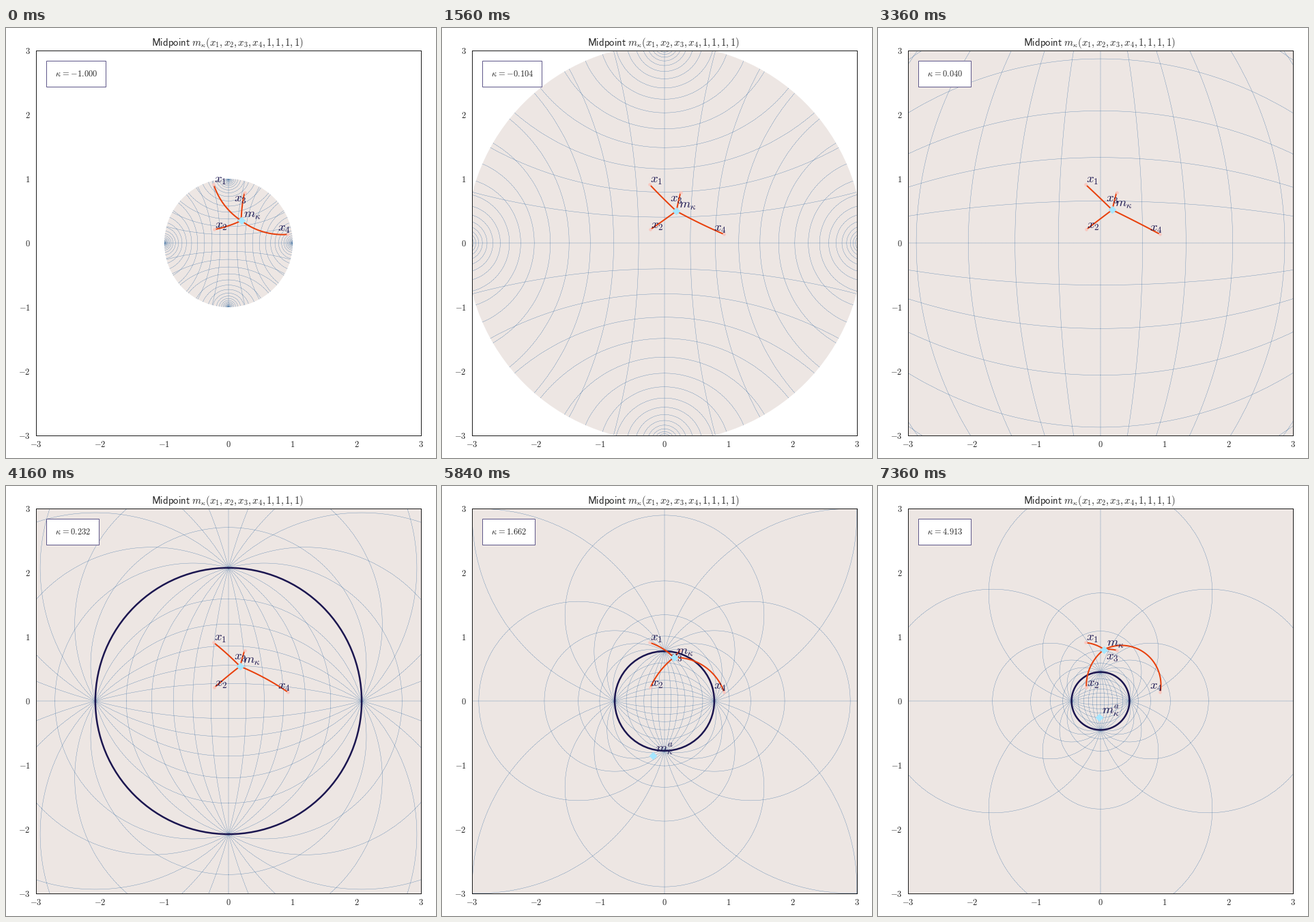
A matplotlib script that plays this animation: 630x630 px, repeating every 7.4 s.

```python
import matplotlib.pyplot as plt
import numpy as np
from matplotlib.animation import FuncAnimation
from matplotlib.collections import LineCollection

plt.rcParams.update({
    "mathtext.fontset": "cm",
    "font.family": "Liberation Serif",
    "text.color": "0.15",
    "xtick.color": "0.15",
    "ytick.color": "0.15",
})

SIZE, DPI = 630, 90
PLANE, GRID, NAVY = "#ede6e3", "#1c5a98", "#1b1650"
RED, SKY, PINK = "#e8400c", "#a6e6ff", "#f9c8c0"
LIM = 3

POINTS = np.array([(-0.23, 0.91), (-0.22, 0.21), (0.25, 0.79), (0.93, 0.135)])
LABEL_SHIFT = np.array([(0.01, 0.03), (0.01, 0.02), (-0.16, -0.15), (-0.16, 0.05)])
MID_SHIFT = np.array([0.04, 0.05])

# Curvatures follow a cubic; the nearly flat ones are skipped.
roots = np.linspace(-1, 1.7, 200)
CURVATURES = roots[np.abs(roots) >= 0.1] ** 3


def tan_k(t, k):
    s = np.sqrt(abs(k))
    return (np.tan(s * t) if k > 0 else np.tanh(s * t)) / s


def arctan_k(r, k):
    s = np.sqrt(abs(k))
    return (np.arctan(s * r) if k > 0 else np.arctanh(s * r)) / s


def mobius_add(x, y, k):
    xy = (x * y).sum(-1, keepdims=True)
    xx = (x * x).sum(-1, keepdims=True)
    yy = (y * y).sum(-1, keepdims=True)
    top = (1 - 2 * k * xy - k * yy) * x + (1 + k * xx) * y
    return top / (1 - 2 * k * xy + k * k * xx * yy)


def geodesic(a, b, k, n=60):
    v = mobius_add(-a, b, k)
    r = np.hypot(*v)
    t = np.linspace(0, 1, n)[:, None]
    return mobius_add(a, tan_k(t * arctan_k(r, k), k) * v / r, k)


def midpoint(k):
    """Gyromidpoint of POINTS with unit weights."""
    lam = 2 / (1 + k * (POINTS ** 2).sum(1))
    num, den = lam @ POINTS, (lam - 1).sum()
    r, s = np.hypot(*num), np.sqrt(abs(k))
    if k > 0:
        half = np.tan(np.arctan2(s * r, den) / 2)
    else:
        half = np.tanh(np.arctanh(s * r / den) / 2)
    return num / r * half / s


def grid_lines(k):
    radius = 1 / np.sqrt(abs(k))
    step = 2 * np.pi * radius / 24
    if k < 0:
        starts = tan_k(step * np.arange(1, 23) / 2, k)
        starts = np.concatenate([starts, -starts])
        b = tan_k(np.linspace(-3.7, 3.7, 161) * radius, k)
    else:
        starts = tan_k(step * np.arange(1, 12) / 2, k)
        b = tan_k(np.linspace(-1, 1, 500) * (np.pi / 2 - 1e-5) * radius, k)
    lines = []
    for a in starts:
        den = 1 + (k * a * b) ** 2
        u = (1 - k * b * b) * a / den
        v = (1 + k * a * a) * b / den
        lines += [np.column_stack([u, v]), np.column_stack([v, u])]
    return lines


fig = plt.figure(figsize=(SIZE / DPI, SIZE / DPI), dpi=DPI, facecolor="white")
ax = fig.add_axes([44 / SIZE, 33 / SIZE, 564 / SIZE, 564 / SIZE])
ax.set(xlim=(-LIM, LIM), ylim=(-LIM, LIM))
ticks = range(-LIM, LIM + 1)
names = [f"${t}$" for t in ticks]
ax.set_xticks(ticks, names)
ax.set_yticks(ticks, names)
ax.tick_params(length=0, labelsize=10)
ax.tick_params(axis="x", pad=5.7)
ax.tick_params(axis="y", pad=6.6)
for spine in ax.spines.values():
    spine.set(color="0.1", linewidth=0.8)
args = r"{,}\,".join(["x_1", "x_2", "x_3", "x_4"] + ["1"] * 4)
ax.set_title(rf"$\mathsf{{Midpoint}}\ m_\kappa({args})$", fontsize=11.8, x=0.4968)

grid_style = dict(color=GRID, linewidth=0.3, linestyle="--", zorder=1)
disc = ax.add_patch(plt.Circle((0, 0), 1, fc=PLANE, ec="none", zorder=0.5))
grid = ax.add_collection(LineCollection([], **grid_style), autolim=False)
cross_x, = ax.plot([], [], **grid_style)
cross_y, = ax.plot([], [], **grid_style)
equator = ax.add_patch(plt.Circle((0, 0), 1, fill=False, ec=NAVY, lw=2, zorder=1.5))
paths = ax.add_collection(LineCollection([], colors=RED, linewidths=1.6, zorder=2),
                          autolim=False)
ax.plot(*POINTS.T, "o", color=PINK, ms=2.6, zorder=2.5)


def label(text, xy=(0, 0), z=3):
    return ax.text(*xy, text, fontsize=15, color=NAVY, zorder=z, clip_on=True)


for i, xy in enumerate(POINTS + LABEL_SHIFT, 1):
    label(f"$x_{i}$", xy)

mid_dot, = ax.plot([], [], "D", color=SKY, ms=6, zorder=5)
anti_dot, = ax.plot([], [], "D", color=SKY, ms=6, zorder=5)
mid_label = label(r"$m_\kappa$", z=6)
anti_label = label(r"$m_\kappa^a$", z=6)
readout = ax.text(0.0488, 0.9512, "", transform=ax.transAxes, va="top", fontsize=9.9,
                  zorder=8, bbox=dict(boxstyle="square,pad=1", fc="white",
                                      ec="#5f588a", lw=0.8))


def place(dot, text, xy):
    dot.set_data([xy[0]], [xy[1]])
    text.set_position(xy + MID_SHIFT)


def update(n):
    k = CURVATURES[n]
    sphere = k > 0
    radius = 1 / np.sqrt(abs(k))
    ax.set_facecolor(PLANE if sphere else "white")
    disc.set_radius(radius)
    equator.set_radius(radius)
    disc.set_visible(not sphere)
    for artist in (equator, anti_dot, anti_label):
        artist.set_visible(sphere)

    m = midpoint(k)
    place(mid_dot, mid_label, m)
    if sphere:
        anti = -m / (k * (m @ m))
        place(anti_dot, anti_label, anti)
        anti_label.set_visible(bool(np.abs(anti).max() < LIM + 0.5))

    reach = LIM if sphere else min(radius, LIM)
    cross_x.set_data([-reach, reach], [0, 0])
    cross_y.set_data([0, 0], [-reach, reach])
    grid.set_segments(grid_lines(k))
    paths.set_segments([geodesic(m, p, k) for p in POINTS])
    value = f"{k:.3f}".replace("-", "{-}")
    readout.set_text(rf"$\kappa\hspace{{0.08}}=\hspace{{0.08}}{value}$")
    return []


anim = FuncAnimation(fig, update, frames=len(CURVATURES), interval=40,
                     repeat=True, repeat_delay=0, blit=False)
plt.show()
```
